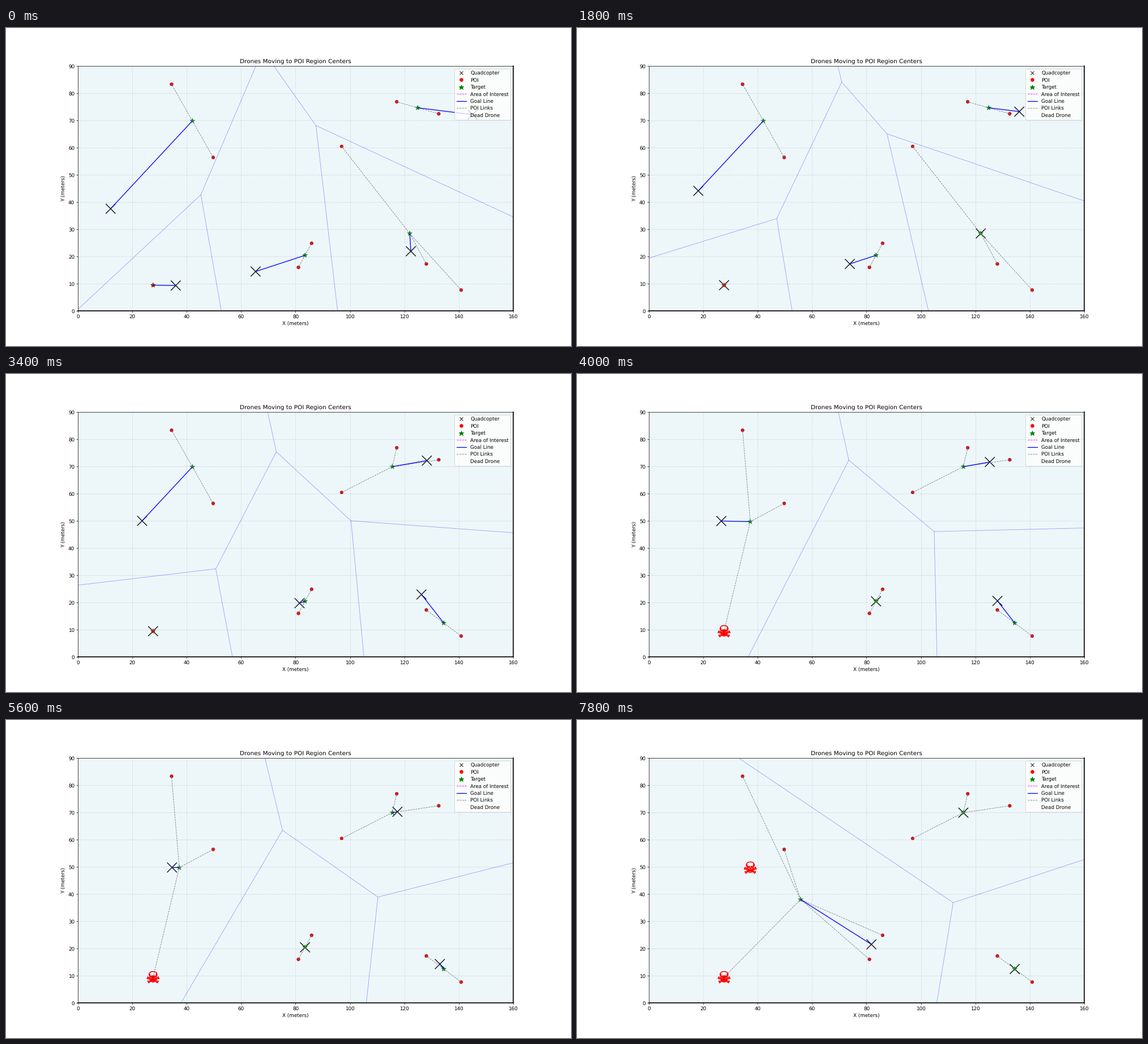
A matplotlib script for the animation above (8 s loop, 998 by 561 pixels).

```python
import numpy as np
import matplotlib.pyplot as plt
from matplotlib.animation import FuncAnimation
from matplotlib.collections import LineCollection
from matplotlib.lines import Line2D

W, H = 160, 90
FRAMES, INTERVAL = 40, 200
SPEED = 1.0  # metres per step

START = np.array([(11.3, 36.87), (36.92, 9.36), (64.35, 14.2),
                  (122.46, 20.98), (146.1, 72.05)])
POIS = np.array([(34.4, 83.35), (49.7, 56.45), (27.6, 9.5), (81.05, 16.05),
                 (85.9, 24.9), (96.95, 60.5), (128.1, 17.3), (140.9, 7.7),
                 (117.2, 76.9), (132.65, 72.5)])
DEATHS = {18: 1, 38: 0}  # step -> drone


def clip(cell, a, b, tag):
    """Keep the part of a cell nearer to a than to b; new edges get the tag."""
    normal, mid = b - a, (a + b) / 2
    out = []
    for (p, t), (q, _) in zip(cell, cell[1:] + cell[:1]):
        dp, dq = (p - mid) @ normal, (q - mid) @ normal
        if dp <= 0:
            out.append((p, t))
        if (dp <= 0) != (dq <= 0):
            cross = p + (q - p) * dp / (dp - dq)
            out.append((cross, tag if dp <= 0 else t))
    return out


def centroid(points):
    x, y = np.array(points).T
    x2, y2 = np.roll(x, -1), np.roll(y, -1)
    c = x * y2 - x2 * y
    return np.array([((x + x2) * c).sum(), ((y + y2) * c).sum()]) / (3 * c.sum())


def voronoi(sites):
    """Inner borders and cell centroids within the field."""
    corners = [np.array(c, float) for c in ((0, 0), (W, 0), (W, H), (0, H))]
    borders, centers = [], []
    for i, a in enumerate(sites):
        cell = [(c, -1) for c in corners]
        for j, b in enumerate(sites):
            if j != i:
                cell = clip(cell, a, b, j)
        points = [p for p, _ in cell]
        for k, (p, tag) in enumerate(cell):
            if tag > i:
                borders.append((p, points[(k + 1) % len(points)]))
        centers.append(centroid(points))
    return borders, np.array(centers)


def simulate():
    pos, alive, steps = START.copy(), list(range(len(START))), []
    for n in range(FRAMES):
        if n in DEATHS:
            alive.remove(DEATHS[n])
        borders, centers = voronoi(pos[alive])
        dist = np.linalg.norm(POIS[:, None] - pos[alive][None], axis=2)
        owner = np.array(alive)[dist.argmin(axis=1)]
        links, goals, targets = [], [], []
        for i in alive:
            own = POIS[owner == i]
            target = own.mean(axis=0) if len(own) else pos[i].copy()
            gap = target - pos[i]
            d = np.hypot(*gap)
            pos[i] = target if d <= SPEED else pos[i] + gap / d * SPEED
            links += [(target, p) for p in own]
            targets.append(target)
            if d > SPEED:
                goals.append((pos[i].copy(), target))
        dead = [i for i in range(len(pos)) if i not in alive]
        steps.append(dict(borders=borders, centers=centers, links=links,
                          goals=goals, targets=np.array(targets),
                          drones=pos[alive], dead=pos[dead]))
    return steps


STEPS = simulate()

plt.rcParams.update({"text.hinting": "none", "font.size": 10.06})
fig = plt.figure(figsize=(16, 8.99402), dpi=62.375)
ax = fig.add_axes([0.1275, 0.11, 0.77, 0.77])
ax.set(xlim=(0, W), ylim=(0, H), facecolor="#edf7fa",
       xlabel="X (meters)", ylabel="Y (meters)",
       title="Drones Moving to POI Region Centers")
ax.grid(True, linestyle=":", linewidth=0.8)
for side in ("right", "bottom"):
    ax.spines[side].set_linewidth(1.9)


def lines(**style):
    return ax.add_collection(LineCollection([], zorder=2, **style), autolim=False)


def dots(points=np.empty((0, 2)), lw=1.0, **style):
    # Two line widths keep the markers from being rounded to whole pixels.
    return ax.scatter(*points.T, linewidths=(lw, lw), **style)


art = {
    "centers": dots(s=1.2, color="#f06080", alpha=0.6, lw=0),
    "drones": dots(s=400, marker="x", color="black", lw=1.5),
    "targets": dots(s=100, marker="*", color="green", lw=0.8),
    "borders": lines(colors="blue", alpha=0.35, linewidths=1),
    "links": lines(colors="gray", linestyles="--", linewidths=1),
    "goals": lines(colors="blue", linewidths=1.5),
    "dead": dots(s=640, marker="$\u2620$", color="red", zorder=3),
}
dots(POIS, s=44, color="#c8161a", lw=0.6)


def key(label, **style):
    return Line2D([], [], label=label, **style)


def mark(label, marker, size, color):
    return key(label, linestyle="None", marker=marker, markersize=size,
               color=color)


ax.legend(loc="upper right", labelspacing=0.43, handles=[
    mark("Quadcopter", "x", 8, "black"),
    mark("POI", "o", 6.5, "red"),
    mark("Target", "*", 10, "green"),
    key("Area of Interest", color="magenta", linestyle="--", linewidth=1),
    key("Goal Line", color="blue", linewidth=1.5),
    key("POI Links", color="gray", linestyle="--", linewidth=1),
    key("Dead Drone", linestyle="None"),
])


def update(n):
    for name, data in STEPS[n].items():
        if isinstance(art[name], LineCollection):
            art[name].set_segments(data)
        else:
            art[name].set_offsets(data)
    return list(art.values())


anim = FuncAnimation(fig, update, frames=FRAMES, interval=INTERVAL,
                     repeat=True, repeat_delay=0, blit=False)
plt.show()
```
